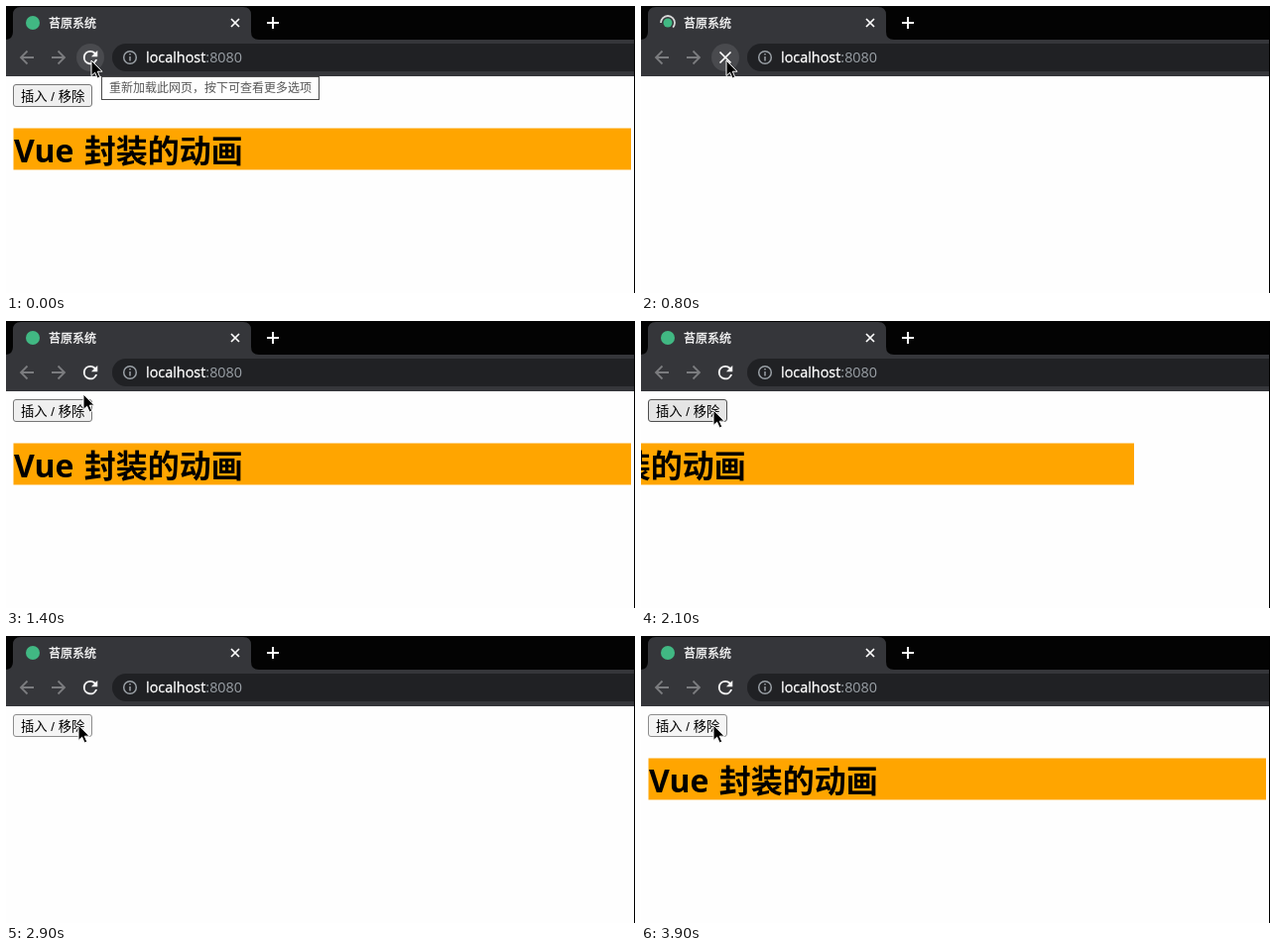
Write an HTML page that moves like this. It is 634x290 px and loops after 4 s.

```html
<!DOCTYPE html>
<html lang="zh-CN">
<head>
<meta charset="utf-8">
<title>Vue 动画</title>
<style>
  html, body { margin: 0; width: 100%; height: 100%; overflow: hidden; background: #fefefe; }
  svg { display: block; width: 634px; height: 290px; }
  text { font-family: "Open Sans", "Noto Sans CJK SC", "Noto Sans CJK", sans-serif; white-space: pre; }
  .line { fill: none; stroke: #fff; stroke-width: 2; }
  .dim { stroke: #7b7c7f; stroke-width: 1.8; }
  .crisp { fill: #fff; stroke: #fff; stroke-width: .3; }

  /* Everything but the spinner runs on one 4 s clock. */
  .page, .heading, .cursor, .tip, .loading, .idle, .halo, .face {
    animation: 4s step-end infinite;
  }
  .page { animation-name: blank; }
  .heading { animation-name: slide, leave; }
  .cursor { animation-name: move; }
  .tip { animation-name: tip; }
  .loading { animation-name: loading; }
  .idle { animation-name: idle; }
  .halo { animation-name: halo; }
  .face { animation-name: press; }
  .spin { transform-origin: 27px 17px; animation: spin 1s steps(10) infinite; }

  @keyframes blank { 0%, 22.5%, 100% { opacity: 1; } 17.5% { opacity: 0; } }
  @keyframes slide {
    0% { transform: translateX(0); }
    22.5% { transform: translateX(-589.2px); animation-timing-function: steps(5); }
    34.99% { transform: translateX(33.8px); }
    35% { transform: translateX(0); }
    50% { transform: translateX(-8.4px); animation-timing-function: steps(5); }
    62.5% { transform: translateX(-631.4px); }
    77.5% { transform: translateX(-589.2px); animation-timing-function: steps(5); }
    89.99% { transform: translateX(33.8px); }
    90%, 100% { transform: translateX(0); }
  }
  @keyframes leave { 0%, 77.5%, 100% { opacity: 1; } 62.5% { opacity: 0; } }
  @keyframes move {
    0% { transform: translate(86px, 55px); }
    32.5% { transform: translate(84px, 61px); }
    35% { transform: translate(78px, 74px); }
    37.5% { transform: translate(74px, 86px); }
    40%, 100% { transform: translate(73px, 90px); }
  }
  @keyframes tip { 0% { opacity: 1; } 10%, 100% { opacity: 0; } }
  @keyframes loading { 0%, 25%, 100% { opacity: 0; } 15% { opacity: 1; } }
  @keyframes idle { 0%, 25%, 100% { opacity: 1; } 15% { opacity: 0; } }
  @keyframes halo { 0% { opacity: 1; } 32.5%, 100% { opacity: 0; } }
  @keyframes press {
    0% { fill: #efefef; stroke: #767676; }
    37.5%, 50%, 77.5% { fill: #e5e5e5; stroke: #4f4f4f; }
    47.5%, 70%, 95%, 100% { fill: #f5f5f5; stroke: #8d8d8d; }
  }
  @keyframes spin { from { transform: rotate(-108deg); } to { transform: rotate(252deg); } }
</style>
</head>
<body>
<svg viewBox="0 0 634 290">
  <rect width="634" height="290" fill="#fefefe"/>

  <g class="page">
    <g class="heading">
      <rect x="7.5" y="123.5" width="622.5" height="42" fill="#ffa500"/>
      <text x="8" y="157.5" font-size="32" font-weight="700" word-spacing="2">Vue 封装的动画</text>
    </g>
    <rect class="face" x="7.5" y="79.5" width="79" height="22" rx="2.5"/>
    <text x="15" y="95.7" font-size="13.33" style="font-family: 'Liberation Sans', 'Noto Sans CJK SC', 'Noto Sans CJK', sans-serif">插入 / 移除</text>
  </g>

  <!-- browser window -->
  <rect width="634" height="34" fill="#030303"/>
  <rect y="34" width="634" height="37" fill="#35363a"/>
  <path d="M-1 34Q7 34 7 26V9Q7 1 15 1H239Q247 1 247 9V26Q247 34 255 34Z" fill="#35363a"/>
  <rect x="107" y="38" width="560" height="28" rx="14" fill="#202124"/>
  <rect x="633" width="1" height="290" fill="#000"/>

  <circle class="idle" cx="27" cy="17" r="7" fill="#41b883"/>
  <g class="loading">
    <circle cx="27" cy="17" r="4.5" fill="#41b883"/>
    <circle class="spin line" cx="27" cy="17" r="7" stroke-dasharray="27 17" style="stroke: #d8d8d8; stroke-width: 1.8"/>
  </g>
  <text class="crisp" x="43" y="21.6" font-size="12">苔原系统</text>
  <path class="line" d="M227 13l8 8m0-8l-8 8" style="stroke-width: 1.7"/>
  <path class="line" d="M263 17h12m-6-6v12"/>

  <path class="line dim" d="M28 52H15m6.5-6.5L15 52l6.5 6.5"/>
  <path class="line dim" d="M46 52h13m-6.5-6.5L59 52l-6.5 6.5"/>
  <circle class="halo" cx="85" cy="52" r="14" fill="#494a4e"/>
  <path class="idle" fill="#fff" transform="translate(74.2 41.2) scale(.9)"
    d="M17.65 6.35A7.96 7.96 0 0 0 12 4a8 8 0 1 0 7.73 10h-2.08A6 6 0 1 1 12 6c1.66 0 3.14.69 4.22 1.78L13 11h7V4z"/>
  <path class="loading line" d="M79.5 46.5l11 11m0-11l-11 11" style="stroke-width: 1.7"/>

  <g class="line dim" style="stroke: #9aa0a6; stroke-width: 1.5">
    <circle cx="125" cy="52" r="6.3"/>
    <path d="M125 51v4.5m0-7.5v1.6"/>
  </g>
  <text class="crisp" x="141" y="57" font-size="14.4">localhost<tspan fill="#9aa0a6" stroke="none">:8080</tspan></text>

  <g class="tip">
    <rect x="96.5" y="71.5" width="219" height="23" fill="#fefefe" stroke="#4a4a4a"/>
    <text x="104" y="87.3" font-size="12" fill="#575757">重新加载此网页，按下可查看更多选项</text>
  </g>

  <path class="cursor" d="M0 0V15.5L3.6 12.2 6.2 18 8.8 17 6.3 11.2H11Z" stroke="#fff" stroke-width="1"/>
</svg>
</body>
</html>
```
